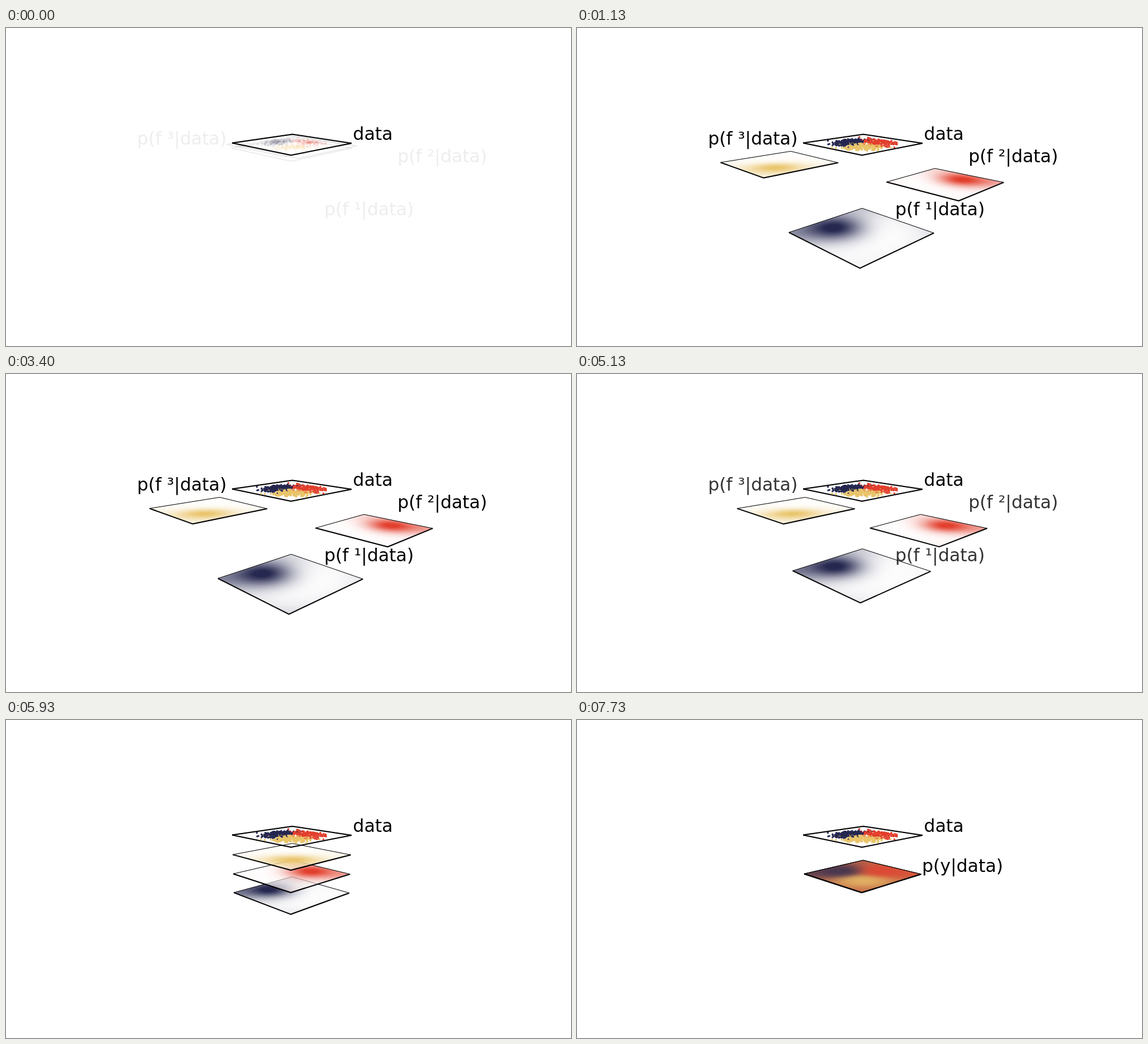
These frames come from a looping animation (960 px wide and 540 px high, 8.99 s). An HTML page with a canvas:

```html
<!DOCTYPE html>
<html lang="en">
<head>
<meta charset="utf-8">
<title>Posterior planes</title>
<style>
  html, body { margin: 0; width: 100%; height: 100%; overflow: hidden; background: #fff; }
  #stage { position: relative; width: 960px; height: 540px; overflow: hidden; background: #fff; }
  #stage > * { position: absolute; left: 0; top: 0; }
  .heat {
    transform-origin: 0 0;
    clip-path: polygon(50% 0, 100% 50%, 50% 100%, 0 50%);
  }
  polyline { fill: none; stroke: #000; stroke-width: 2; stroke-linejoin: round; }
  text { font: 30px "DejaVu Sans", sans-serif; }
</style>
</head>
<body>
<div id="stage"></div>
<script>
const LOOP = 8990, FPS = 15, SIZE = 96;
const SVG = 'http://www.w3.org/2000/svg';
const stage = document.getElementById('stage');
const COLORS = [[38, 40, 80], [226, 64, 46], [233, 196, 106]];

const clamp = v => Math.max(0, Math.min(1, v));
const mix = (a, b, k) => a + (b - a) * k;
const bell = (r, n, x, y, sx, sy) => Math.exp(-((r - x) ** 2 / sx + (n - y) ** 2 / sy));

function svgNode(parent, tag, attrs) {
  const node = document.createElementNS(SVG, tag);
  for (const key in attrs) node.setAttribute(key, attrs[key]);
  return parent.appendChild(node);
}
const layer = () => svgNode(stage, 'svg', { width: 960, height: 540 });

function makeCanvas(w, h) {
  const el = document.createElement('canvas');
  el.width = w;
  el.height = h;
  return stage.appendChild(el);
}

// Perspective: r runs right, n towards the viewer, z down the stack.
const CAM = {
  x: [485.5, 100.77, -74.9, 5.4],
  y: [195.5, -0.12, -12.33, 36],
  w: [1, -0.0015, -0.152, 0.0115]
};
const dot = (c, r, n, z) => c[0] + c[1] * r + c[2] * n + c[3] * z;
function project(r, n, z) {
  const w = dot(CAM.w, r, n, z);
  return [dot(CAM.x, r, n, z) / w, dot(CAM.y, r, n, z) / w];
}

function edge(r, n, z, corners) {
  return corners.map(([a, b]) => project(r + a, n + b, z).map(v => v.toFixed(2)).join()).join(' ');
}
const BACK = [[-1, 0], [0, -1], [1, 0]];
const FRONT = [[-1, 0], [0, 1], [1, 0]];

// Maps the heat canvas onto the tilted plane.
function planeMatrix(r, n, z) {
  const s = 2 / SIZE;
  const row = c => [c[1] * s, c[2] * s, dot(c, r - 1, n - 1, z)];
  const [x, y, w] = [row(CAM.x), row(CAM.y), row(CAM.w)];
  const m = [0, 1].map(i => [x[i], y[i], 0, w[i]]);
  return `matrix3d(${[...m[0], ...m[1], 0, 0, 1, 0, x[2], y[2], 0, w[2]].join()})`;
}

// A blob with a tail along the back left edge.
const wedge = (r, n) =>
  0.72 * bell(r, n, -0.33, -0.12, 0.13, 0.16) + 0.5 * bell(r + n, r - n, -0.9, -0.5, 0.4, 1.5);
const FIELDS = [
  wedge,
  (r, n) => wedge(-0.06 - r, n),
  (r, n) => 0.72 * bell(r, n, 0.02, 0.36, 0.17, 0.1) + 0.28 * bell(r, n, 0, 0.5, 0.75, 0.35)
];
const DRIFT = [0.11, 0.05, 0.06];
const BASE = [0.1, 0.28, 0.2];

function density(j, r, n, step) {
  const a = Math.PI / 2 - (step - 29) * 0.0714 + j * 2;
  const far = (r * r + n * n) ** 1.5;
  return clamp(FIELDS[j](r, n) + DRIFT[j] * far * (1 + 0.7 * (r * Math.sin(a) + n * Math.cos(a))));
}

function paintHeat(ctx, j, step, merge) {
  const img = ctx.createImageData(SIZE, SIZE);
  for (let y = 0, p = 0; y < SIZE; y++) {
    for (let x = 0; x < SIZE; x++, p += 4) {
      const r = (x + 0.5) * 2 / SIZE - 1, n = (y + 0.5) * 2 / SIZE - 1;
      if (Math.abs(r) + Math.abs(n) > 1.06) continue;
      const d = density(j, r, n, step);
      const alpha = mix(0.6 + 0.4 * d, 1, merge);
      let weights, sum;
      if (merge) {
        weights = BASE.map((b, i) => b + 2 * density(i, r, n, step) ** 2);
        sum = weights[0] + weights[1] + weights[2];
      }
      for (let c = 0; c < 3; c++) {
        let v = mix(255, COLORS[j][c], d);
        if (merge) {
          const blend = weights.reduce((t, w, i) => t + w * COLORS[i][c], 0) / sum;
          v = mix(v, blend, merge);
        }
        img.data[p + c] = (v - (1 - alpha) * 255) / alpha;
      }
      img.data[p + 3] = alpha * 255;
    }
  }
  ctx.putImageData(img, 0, 0);
}

// Depth in the stack and sideways travel of each plane.
const planes = [
  { z: 3, r: 0, n: 1.385 },
  { z: 2, r: 1.41, n: 0 },
  { z: 1, r: -1.415, n: 0 }
];
for (const p of planes) {
  p.canvas = makeCanvas(SIZE, SIZE);
  p.canvas.className = 'heat';
  p.ctx = p.canvas.getContext('2d');
  p.svg = layer();
  p.back = svgNode(p.svg, 'polyline');
  p.front = svgNode(p.svg, 'polyline');
}

// Data plane
const frame = layer();
svgNode(frame, 'polyline', { points: edge(0, 0, 0, BACK) });
svgNode(frame, 'polyline', { points: edge(0, 0, 0, FRONT) });
const dots = makeCanvas(960, 540).getContext('2d');

let seed = 11;
function random() {
  seed = (seed * 16807) % 2147483647;
  return seed / 2147483647;
}
const normal = () => Math.sqrt(-2 * Math.log(random())) * Math.cos(2 * Math.PI * random());

// Each cluster: centre, spread and slope.
const points = [];
[[-0.23, -0.09, 0.15, 0.16, -0.6], [0.26, -0.09, 0.15, 0.17, 0.5], [0.02, 0.37, 0.16, 0.13, 0]]
  .forEach(([r, n, sr, sn, slope], j) => {
    for (let k = 0; k < 230; k++) {
      const dr = sr * normal();
      const pr = r + dr, pn = n + slope * dr + sn * normal();
      if (Math.abs(pr) + Math.abs(pn) < 0.9) points.push({ r: pr, n: pn, j });
    }
  });
points.sort((a, b) => a.n - b.n);

function paintDots(alpha) {
  dots.clearRect(0, 0, 960, 540);
  dots.globalAlpha = alpha;
  for (const { r, n, j } of points) {
    const [x, y] = project(r, n, 0);
    dots.fillStyle = `rgb(${COLORS[j]})`;
    dots.beginPath();
    dots.arc(x, y, 1.7, 0, 7);
    dots.fill();
  }
}

// Labels
const words = layer();
function label(x, y, str) {
  const node = svgNode(words, 'text', { x, y });
  node.textContent = str;
  return node;
}
label(589.6, 190, 'data');
const names = [
  label(540.7, 318, 'p(f ¹|data)'),
  label(665.2, 228, 'p(f ²|data)'),
  label(222.7, 198, 'p(f ³|data)')
];
const result = label(586.2, 257.5, 'p(y|data)');

function draw(i) {
  const open = clamp((i + 1) / 15);
  const spread = i < 75 ? open : clamp(1 - (i - 74) / 15);
  const merge = clamp((i - 89) / 15);
  const hot = i >= 15;
  const step = Math.min(i, 74);

  planes.forEach((p, j) => {
    const r = p.r * spread, n = p.n * spread;
    const z = mix(p.z * open, 2, merge);
    p.svg.style.opacity = open;
    p.back.setAttribute('points', edge(r, n, z, BACK));
    p.front.setAttribute('points', edge(r, n, z, FRONT));
    p.back.style.strokeWidth = hot ? 1 : 2;
    p.canvas.style.visibility = hot ? 'visible' : 'hidden';
    p.canvas.style.transform = planeMatrix(r, n, z);
    const key = step + '/' + merge;
    if (hot && p.key !== key) {
      p.key = key;
      paintHeat(p.ctx, j, step, merge);
    }
  });
  if (draw.alpha !== open) paintDots(draw.alpha = open);
  for (const node of names) node.style.opacity = spread;
  result.style.opacity = merge;
}

let shown = -1;
const start = performance.now();
function tick() {
  const t = (performance.now() - start) % LOOP;
  const i = Math.min(119, Math.floor((t + 4) * FPS / 1000));
  if (i !== shown) draw(shown = i);
  requestAnimationFrame(tick);
}
tick();
</script>
</body>
</html>
```
